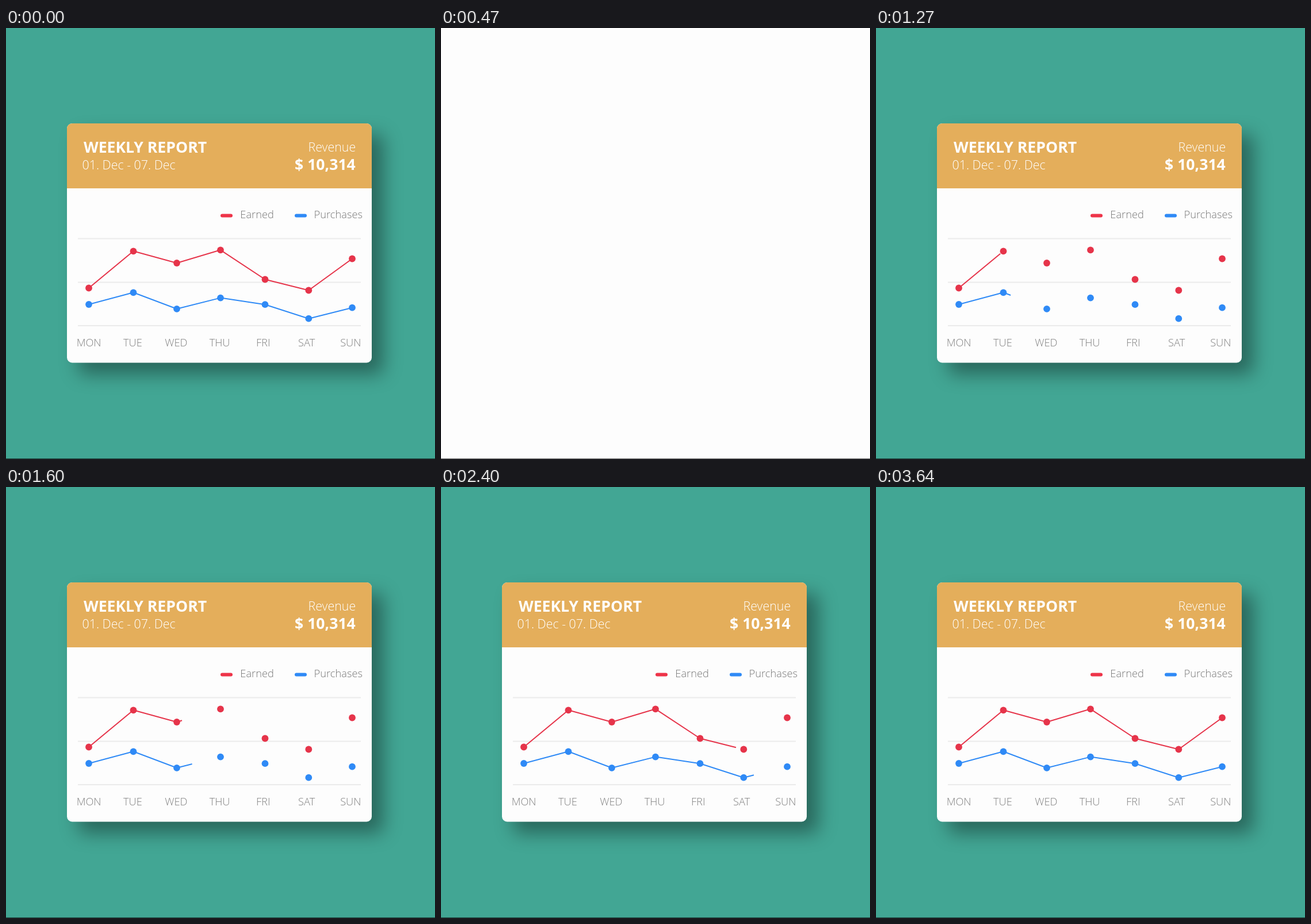
An HTML page with a canvas that plays this animation: 746 by 750 pixels, repeating every 4.27 s.

```html
<!DOCTYPE html>
<html lang="en">
<head>
<meta charset="utf-8">
<title>Weekly report</title>
<style>
  html, body { margin: 0; width: 100%; height: 100%; overflow: hidden; background: #42a694; }
  canvas { display: block; }
</style>
</head>
<body>
<canvas id="stage" width="746" height="750"></canvas>
<script>
const ctx = document.getElementById('stage').getContext('2d');
const W = 746, H = 750, LOOP = 4270;
const RED = '#e6344a', BLUE = '#2f8af6', PAPER = '#fdfdfd';
const CARD = { x: 106, y: 166, w: 530, h: 416.5, r: 9, head: 113 };

const xs = [144, 221.5, 297, 373, 450.5, 526.3, 602];
const series = [
  { color: RED, ys: [452.5, 388.3, 409, 386.3, 437.5, 456.5, 401.5] },
  { color: BLUE, ys: [481, 460.3, 488.8, 469.6, 481.2, 505.7, 486.7] }
];
const days = [
  ['MON', 144], ['TUE', 219.8], ['WED', 295.4], ['THU', 371],
  ['FRI', 446.9], ['SAT', 522.8], ['SUN', 598.7]
];

function box(x, y, w, h, r, color) {
  ctx.fillStyle = color;
  ctx.beginPath();
  ctx.roundRect(x, y, w, h, r);
  ctx.fill();
}

// Centres the visible ink of the text on cx.
function label(text, cx, base, size, weight, color) {
  ctx.font = `${weight} ${size}px "Open Sans", sans-serif`;
  ctx.fillStyle = color;
  const m = ctx.measureText(text);
  ctx.fillText(text, cx - (m.actualBoundingBoxRight - m.actualBoundingBoxLeft) / 2, base);
}

function drawCard() {
  const { x, y, w, h, r, head } = CARD;
  ctx.save();
  ctx.shadowColor = 'rgba(0, 0, 0, 0.38)';
  ctx.shadowBlur = 32;
  ctx.shadowOffsetX = ctx.shadowOffsetY = 20;
  box(x, y, w, h, r, PAPER);
  ctx.restore();
  box(x, y, w, head, [r, r, 0, 0], '#e4ae5b');

  label('WEEKLY REPORT', 241.8, 217, 26.6, 700, '#fff');
  label('01. Dec - 07. Dec', 214, 245.5, 21.4, 300, '#fff');
  label('Revenue', 567.5, 215.3, 21.4, 300, '#fff');
  label('$ 10,314', 555.3, 247, 26.6, 700, '#fff');

  box(373, 323.5, 21, 6, 3, '#ee3449');
  box(502, 323.5, 21, 6, 3, BLUE);
  label('Earned', 436.7, 331, 18.3, 300, '#777');
  label('Purchases', 578, 331, 18.3, 300, '#777');

  for (const gy of [365.5, 441.5, 517]) box(125, gy, 492, 2, 0, '#ebebeb');
  for (const [name, cx] of days) label(name, cx, 554.3, 18.3, 300, '#808080');
}

// Strokes only the first `len` pixels of the polyline, then adds the dots.
function drawSeries({ color, ys }, len) {
  ctx.strokeStyle = ctx.fillStyle = color;
  ctx.lineWidth = 2;
  ctx.lineJoin = 'round';
  if (len > 0) {
    ctx.beginPath();
    ctx.moveTo(xs[0], ys[0]);
    for (let i = 1; i < xs.length && len > 0; i++) {
      const dx = xs[i] - xs[i - 1], dy = ys[i] - ys[i - 1];
      const d = Math.hypot(dx, dy), k = Math.min(1, len / d);
      ctx.lineTo(xs[i - 1] + dx * k, ys[i - 1] + dy * k);
      len -= d;
    }
    ctx.stroke();
  }
  xs.forEach((x, i) => {
    ctx.beginPath();
    ctx.arc(x, ys[i], 5.9, 0, Math.PI * 2);
    ctx.fill();
  });
}

function draw(t) {
  const blank = t >= 470 && t < 970;
  box(0, 0, W, H, 0, blank ? PAPER : '#42a694');
  if (!blank) {
    const step = Math.floor(t * 0.03 + 1e-6) / 0.03; // 30 steps per second
    const len = t < 470 ? Infinity : 8.5 + (step - 966.7) * 0.284;
    drawCard();
    for (const s of series) drawSeries(s, len);
  }
  box(0, H - 1, W, 1, 0, 'rgba(0, 0, 0, 0.6)');
}

const start = performance.now();
function tick() {
  draw((performance.now() - start) % LOOP);
  requestAnimationFrame(tick);
}
tick();
</script>
</body>
</html>
```
